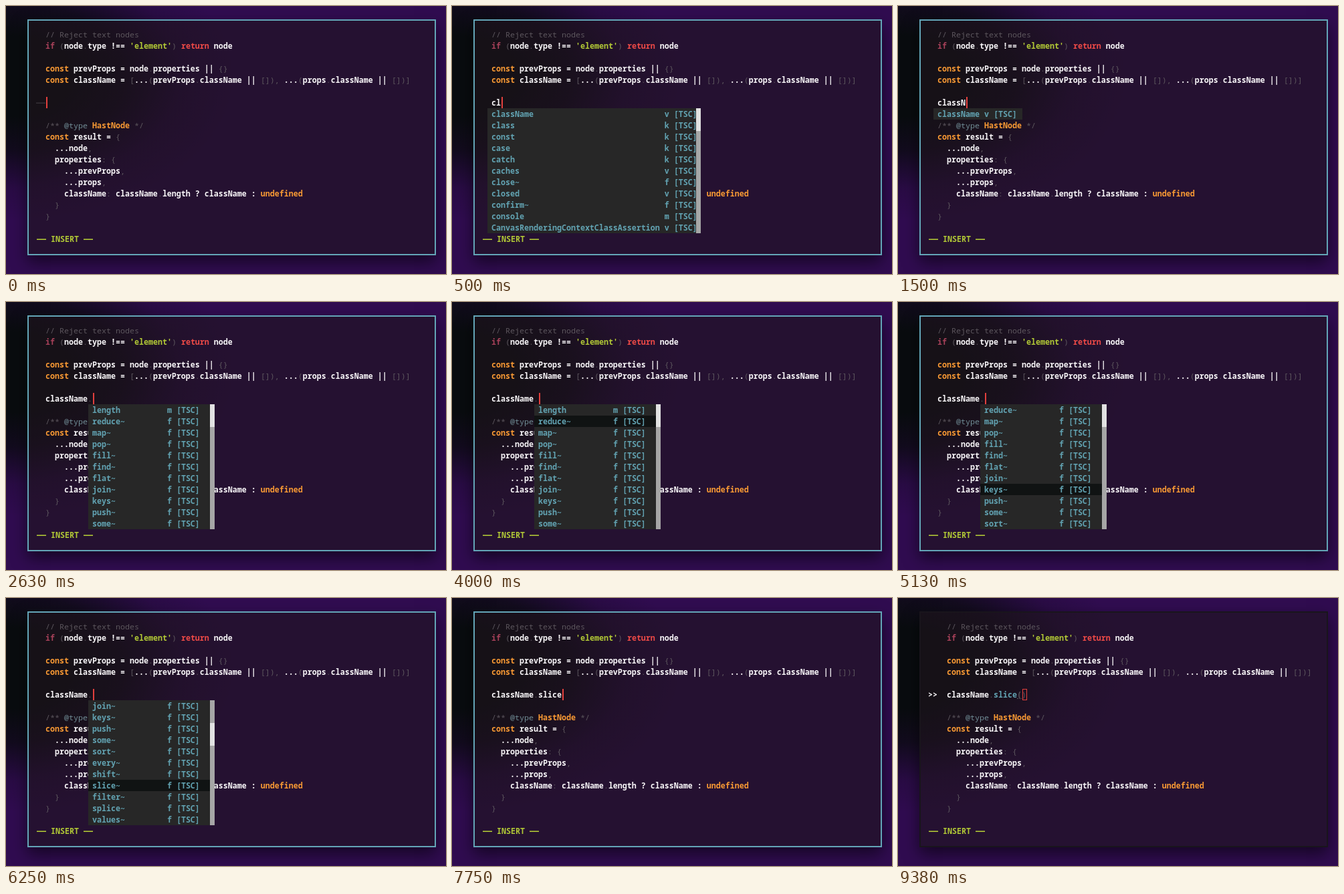
Recreate the animation shown at these times as an HTML page. Size 658 by 401 pixels, loop 9.62 s.

```html
<!DOCTYPE html>
<html lang="en">
<head>
<meta charset="utf-8">
<title>Editor completion</title>
<style>
html, body { margin: 0; width: 100%; height: 100%; overflow: hidden; }
#stage {
  position: relative; width: 658px; height: 401px; overflow: hidden;
  background: radial-gradient(ellipse 340px 215px at 0 105px, #090c0f 0 28%, rgba(13, 11, 21, .85) 52%, rgba(28, 11, 46, .35) 78%, transparent 100%), #300c50;
  font: 600 11.667px/17px "Noto Sans Mono", "DejaVu Sans Mono", monospace;
  font-variant-ligatures: none; color: #f8f6f8;
}
#stage * { position: absolute; box-sizing: border-box; white-space: pre; }
#stage span { position: static; }
#win {
  left: 32px; top: 20px; width: 611px; height: 353px;
  background: rgba(30, 21, 29, .6); border: 2px solid #63a5b7;
  box-shadow: 0 10px 22px rgba(0, 0, 0, .55);
}
#code { left: 59px; top: 34px; }
#sign { left: 45px; top: 136px; }
#mode { left: 46px; top: 340px; color: #b2c936; }
#cursor { top: 136px; width: 2px; height: 17px; background: #e2403d; }
#cursor.hollow { width: 7px; background: none; border: 1px solid #e2403d; }
#menu { top: 153px; background: #272727; color: #62a3b2; overflow: hidden; }
#rows { left: 6px; top: 0; }
#pick { left: 0; width: 182px; height: 17px; background: #101313; }
#bar { right: 0; top: 0; width: 7px; height: 100%; background: #a6a6a6; }
#thumb { right: 0; width: 7px; height: 34px; background: #e2e2e2; }
.dim { color: #5c565d; font-weight: 500; }
.tag { color: #718d96; font-weight: 500; }
.key { color: #f99a34; }
.str { color: #b2c936; }
.ret { color: #ee4a47; }
.cond { color: #a8415a; }
.fn { color: #62a3b2; }
.pair { color: #5c565d; text-decoration: underline; }
.fill { color: rgba(255, 255, 255, .13); }
</style>
</head>
<body>
<div id="stage">
  <div id="win"></div>
  <div id="code"></div>
  <div id="sign"></div>
  <div id="mode">—— INSERT ——</div>
  <div id="menu">
    <div id="pick"></div><div id="rows"></div><div id="bar"></div><div id="thumb"></div>
  </div>
  <div id="cursor"></div>
</div>
<script>
const LOOP = 9620, CELL = 7, ROW = 17, MAX_ROWS = 11;
const $ = id => document.getElementById(id);
const [win, code, sign, menu, pick, rows, bar, thumb, cursor] =
  ['win', 'code', 'sign', 'menu', 'pick', 'rows', 'bar', 'thumb', 'cursor'].map($);

const before = `// Reject text nodes
if (node.type !== 'element') return node

const prevProps = node.properties || {}
const className = [...(prevProps.className || []), ...(props.className || [])]

`;
const after = `

/** @type HastNode */
const result = {
  ...node,
  properties: {
    ...prevProps,
    ...props,
    className: className.length ? className : undefined
  }
}`;

const kinds = ['dim', 'tag', 'key', 'str', 'ret', 'cond', 'fn', 'pair', '', 'dim'];
const token = /(\/\/.*|\/\*\*|\*\/)|(@type)|\b(const|undefined|HastNode)\b|('.*?')|\b(return)\b|\b(if)\b|\b(slice(?=\())|(\((?=\)))|(\.{3})|([.()[\]{},]|(?<! ):)/g;
const paint = text => text.replace(token, (m, ...groups) => {
  const kind = kinds[groups.findIndex((g, i) => i < kinds.length && g !== undefined)];
  return kind ? `<span class="${kind}">${m}</span>` : m;
});

// "word kind" entries, separated by commas
const list = text => text.split(',').map(s => s.split(' '));
const broad = list('className v,class k,const k,case k,catch k,caches v,close~ f,closed v,confirm~ f,console m,CanvasRenderingContextClassAssertion v,crypto v');
const narrow = list('className v,class k,ClassDecorator t,ClassDecoratorContext t,ClassFieldDecoratorContext t,ClassMethodDecoratorContext t,ClassGetterDecoratorContext t,CanvasRenderingContextClassAssertion v');
const exact = list('className v');
const methods = list('length m,reduce~ f,map~ f,pop~ f,fill~ f,find~ f,flat~ f,join~ f,keys~ f,push~ f,some~ f,sort~ f,every~ f,shift~ f,slice~ f,filter~ f,splice~ f,values~ f');
const METHOD_TOTAL = 45;

const typing = [
  [0, ''], [380, 'c'], [500, 'cl'], [630, 'cla'], [750, 'class'], [1500, 'classN'],
  [1750, 'classNa'], [1880, 'classNam'], [2000, 'className'], [2380, 'className.'],
  [7750, 'className.slice'], [7880, 'className.slice()']
];
const menus = [
  [0, null],
  [500, { items: broad, col: 0, word: 36, width: 319, scroll: true }],
  [750, { items: narrow, col: 0, word: 36, width: 319 }],
  [1500, { items: exact, col: 0, word: 9, width: 133 }],
  [2380, null],
  [2630, { items: methods, col: 10, word: 15, width: 189, scroll: true }],
  [7750, null]
];
const picks = [3630, 4000, 4130, 4250, 4500, 4630, 4750, 5000, 5130, 5380, 5500, 5750, 5880, 6130, 6250];
const stops = [...new Set([...typing, ...menus].map(s => s[0]).concat(picks, 8130, 9250, 9380))].sort((a, b) => a - b);

const at = (steps, t) => steps.filter(s => s[0] <= t).pop()[1];

function drawMenu(m, t) {
  menu.style.display = m ? 'block' : 'none';
  if (!m) return;
  const chosen = m.items === methods ? picks.filter(p => p <= t).length - 1 : -1;
  const first = Math.max(0, chosen - 7);
  const shown = m.items.slice(first, first + MAX_ROWS);
  const hidden = METHOD_TOTAL - MAX_ROWS;
  const thumbRow = Math.floor((first * 9 + hidden / 2) / hidden);
  menu.style.left = 53 + m.col * CELL + 'px';
  menu.style.width = m.width + 'px';
  menu.style.height = shown.length * ROW + 'px';
  rows.textContent = shown.map(([word, kind]) => `${word.padEnd(m.word)} ${kind} [TSC]`).join('\n');
  pick.style.display = chosen < 0 ? 'none' : 'block';
  pick.style.top = (chosen - first) * ROW + 'px';
  bar.style.display = thumb.style.display = m.scroll ? 'block' : 'none';
  thumb.style.top = thumbRow * ROW + 'px';
}

function draw(t) {
  const line = at(typing, t);
  const signed = t >= 8130, blurred = t >= 9250;
  const left = signed ? 73 : 59;
  const column = line.length - line.endsWith(')');
  code.style.left = left + 'px';
  code.innerHTML = paint(before + line + after);
  sign.textContent = signed ? '>>' : line ? '' : '——';
  sign.className = signed ? '' : 'fill';
  cursor.style.left = left + 1 + column * CELL + 'px';
  cursor.className = blurred ? 'hollow' : '';
  win.style.borderColor = t >= 9380 ? '#19151c' : blurred ? '#3e5d6a' : '#63a5b7';
  drawMenu(at(menus, t), t);
}

let last;
function tick() {
  const t = performance.now() % LOOP;
  const stop = stops.filter(s => s <= t).pop();
  if (stop !== last) draw(last = stop);
  requestAnimationFrame(tick);
}
tick();
</script>
</body>
</html>
```
